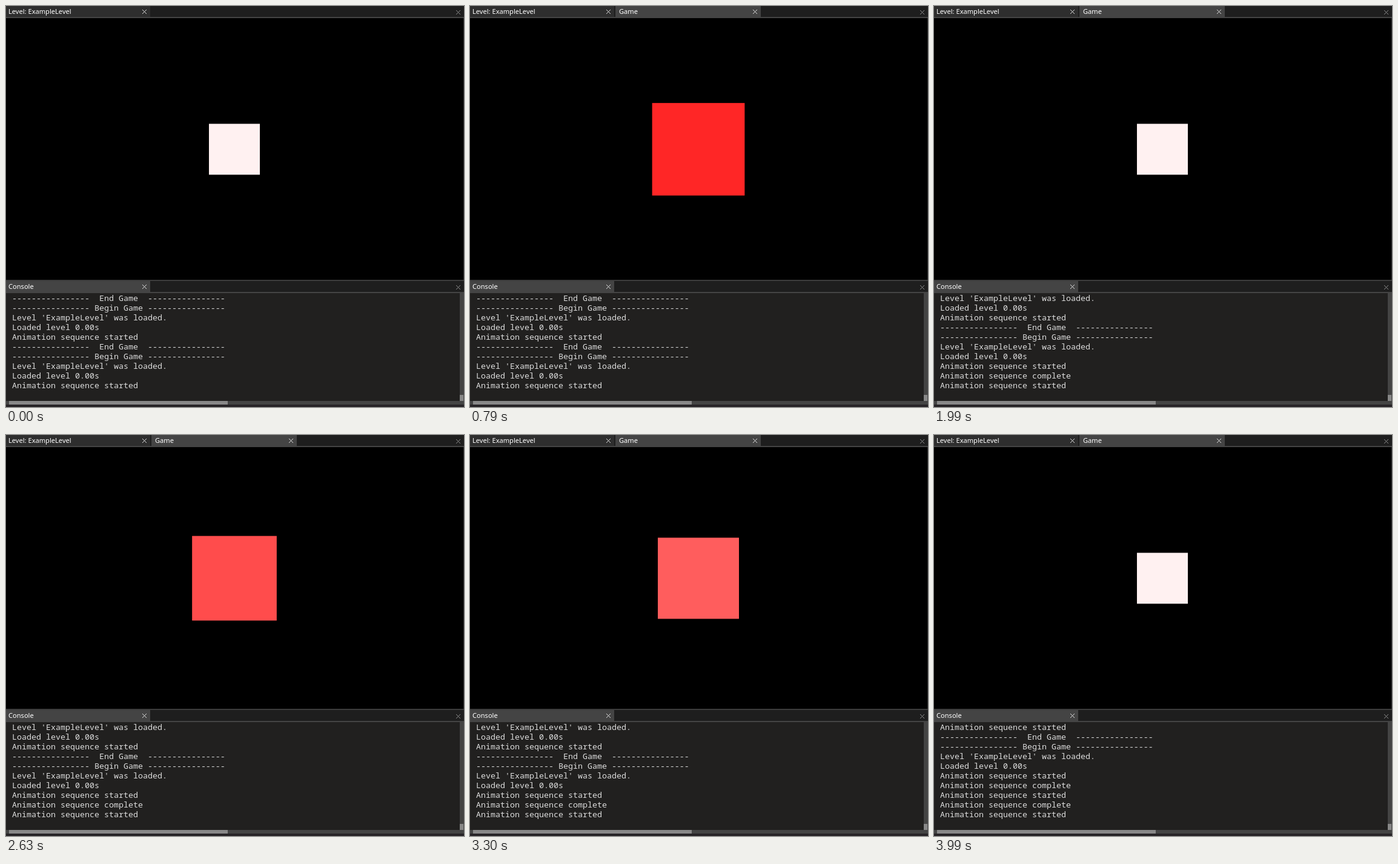
An HTML page with a canvas for the animation above (4.04 s loop, 756 px wide and 662 px high).

```html
<!DOCTYPE html>
<html lang="en">
<head>
<meta charset="utf-8">
<title>Level animation</title>
<style>
html, body { margin: 0; width: 100%; height: 100%; overflow: hidden; background: #000; }
canvas { display: block; }
</style>
</head>
<body>
<canvas id="stage" width="756" height="662"></canvas>
<script>
const ctx = document.getElementById('stage').getContext('2d');
const LOOP = 4040;
const HALF = 995;   // ms to grow, and again to shrink
const LEAD = 58;    // ms already played when the loop begins

const started = 'Animation sequence started';
const complete = 'Animation sequence complete';
const dashes = '-'.repeat(16);
const session = [
  dashes + '  End Game  ' + dashes,
  dashes + ' Begin Game ' + dashes,
  "Level 'ExampleLevel' was loaded.",
  'Loaded level 0.00s',
  started
];
const log = [...session, ...session, complete, started, complete, started];

// Steps of 50 ms, with a short one about every 240 ms.
function lastTick(time) {
  let t = 0, due = 155;
  while (true) {
    const short = t >= due;
    const next = t + (short ? 30 : 50);
    if (next > time) return t;
    if (short) due += 240;
    t = next;
  }
}

function rect(x, y, w, h, color) {
  ctx.fillStyle = color;
  ctx.fillRect(x, y, w, h);
}

function cross(x, y, color) {
  ctx.strokeStyle = color;
  ctx.lineWidth = 1;
  ctx.beginPath();
  ctx.moveTo(x - 3.5, y - 3.5);
  ctx.lineTo(x + 3.5, y + 3.5);
  ctx.moveTo(x + 3.5, y - 3.5);
  ctx.lineTo(x - 3.5, y + 3.5);
  ctx.stroke();
}

function tab(x, y, w, label, textX, color) {
  rect(x, y, w, 18, color);
  ctx.font = '11.1px "Noto Sans", "Open Sans", sans-serif';
  ctx.fillStyle = '#fff';
  ctx.fillText(label, textX, y + 13);
  cross(x + w - 9.5, y + 9.5, '#ddd');
}

function bar(y) {
  rect(0, y, 756, 18, '#1e1e1e');
  rect(0, y + 18, 756, 2, '#444');
  cross(746.5, y + 10.5, '#8c8c8c');
}

function drawScene(t) {
  rect(0, 0, 756, 662, '#000');
  bar(0);
  tab(0, 0, 238, 'Level: ExampleLevel', 4, '#2e2e2e');
  if (t > 0) tab(240, 0, 240, 'Game', 246, '#444');
  rect(755, 20, 1, 432, '#333');

  // Triangle wave: 0 is small and white, 1 is large and red.
  const p = 1 - Math.abs(1 - (t + LEAD) / HALF % 2);
  const size = 79 + 86.5 * p;
  const tint = Math.round(256 * (1 - p));
  rect(377 - size / 2, 236.5 - size / 2, size, size, `rgb(255,${tint},${tint})`);
}

function drawConsole(t) {
  rect(0, 452, 756, 2, '#3c3c3c');
  bar(454);
  tab(0, 454, 238, 'Console', 4, '#444');
  rect(0, 474, 756, 188, '#21201f');

  // Each finished cycle logs two more lines.
  const first = 2 * Math.floor((t + LEAD) / (2 * HALF));
  ctx.font = '13.333px "Noto Sans Mono", "DejaVu Sans Mono", monospace';
  ctx.fillStyle = '#dcdcdc';
  log.slice(first, first + 10).forEach((line, i) => ctx.fillText(line, 10, 487 + 16 * i));

  rect(749, 474, 7, 178, '#444');
  rect(749, 642, 6, 10, '#888');
  rect(0, 652, 756, 6, '#444');
  rect(5, 652, 361, 6, '#888');
  rect(0, 658, 756, 4, '#272427');
}

const origin = performance.now();
function frame(now) {
  const t = lastTick(Math.max(0, now - origin) % LOOP);
  drawScene(t);
  drawConsole(t);
  requestAnimationFrame(frame);
}
frame(origin);
</script>
</body>
</html>
```
